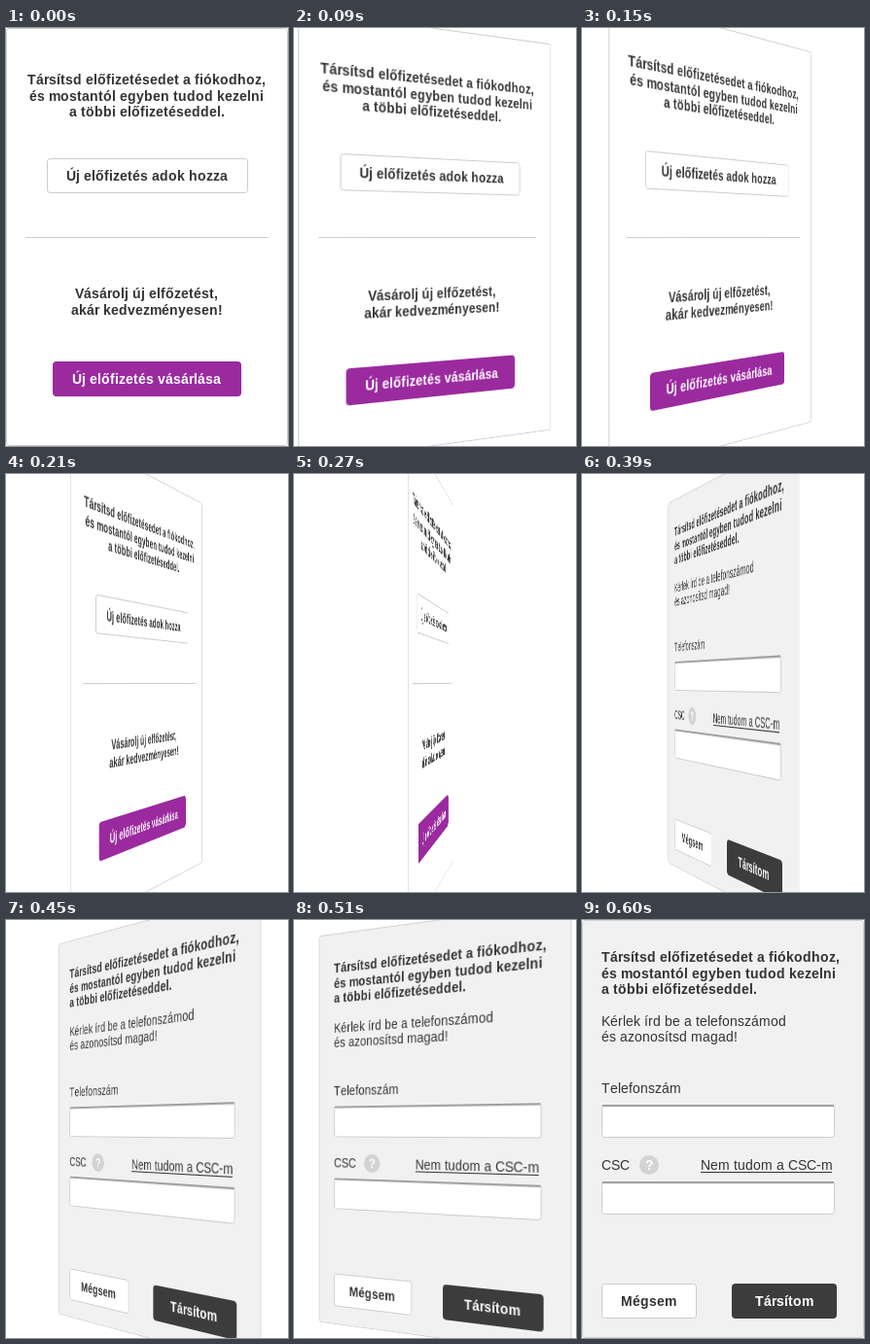
An HTML page that plays this animation: 290x430 px, repeating every 0.63 s.

```html
<!DOCTYPE html>
<html lang="hu">
<head>
<meta charset="utf-8">
<title>Előfizetés</title>
<style>
  html, body { margin: 0; width: 100%; height: 100%; overflow: hidden; background: #fff; }
  .stage { position: relative; width: 290px; height: 430px; overflow: hidden; perspective: 800px; }
  .card, .face { position: absolute; inset: 0; }
  .card { transform-style: preserve-3d; }
  .face { backface-visibility: hidden; }
  .back { transform: rotateY(180deg); }
  svg { display: block; }
  text { font: 14px "Liberation Sans", Arial, sans-serif; font-kerning: none; fill: #333; }
  .bold { font-weight: bold; }
  .light { fill: #fff; }
</style>
</head>
<body>
<div class="stage">
  <div class="card">
    <div class="face front"><svg width="290" height="430"></svg></div>
    <div class="face back"><svg width="290" height="430"></svg></div>
  </div>
</div>
<script>
const NS = 'http://www.w3.org/2000/svg';
const STEP = 30, STEPS = 21, TURN = 9;
const pen = document.createElement('canvas').getContext('2d');

function add(svg, tag, attrs) {
  const el = document.createElementNS(NS, tag);
  for (const k in attrs) el.setAttribute(k, attrs[k]);
  return svg.appendChild(el);
}

function box(svg, x, y, width, height, fill, stroke, rx = 3) {
  const o = stroke ? 0.5 : 0;
  add(svg, 'rect', {
    x: x + o, y: y + o, width: width - 2 * o, height: height - 2 * o,
    rx, fill, stroke: stroke || 'none'
  });
}

// Glyphs advance by whole pixels; x = null centres the line.
function write(svg, str, x, y, cls = '') {
  pen.font = (cls.includes('bold') ? 'bold ' : '') + '14px "Liberation Sans", Arial, sans-serif';
  const steps = [...str].map(c => Math.round(pen.measureText(c).width));
  const total = steps.reduce((a, b) => a + b, 0);
  let at = x === null ? Math.floor((290 - total) / 2) : x;
  const xs = steps.map(w => (at += w) - w);
  add(svg, 'text', { x: xs.join(' '), y, class: cls }).textContent = str;
}

function field(svg, y) {
  box(svg, 20, y, 240, 34, '#fff', '#ccc');
  add(svg, 'rect', { x: 21, y, width: 238, height: 1, fill: '#999' });
  add(svg, 'rect', { x: 20.5, y: y + 1, width: 239, height: 1, fill: '#aaa' });
  add(svg, 'rect', { x: 21, y: y + 2, width: 238, height: 1, fill: '#eee' });
}

const [front, back] = document.querySelectorAll('svg');
const intro = ['Társítsd előfizetésedet a fiókodhoz,', 'és mostantól egyben tudod kezelni', 'a többi előfizetéseddel.'];

box(front, 0, 0, 290, 430, '#fff', '#ccc');
intro.forEach((s, i) => write(front, s, null, [58, 75, 91][i], 'bold'));
box(front, 42, 134, 207, 36, '#fff', '#ccc');
write(front, 'Új előfizetés adok hozza', 62, 157, 'bold');
add(front, 'rect', { x: 20, y: 215, width: 250, height: 1, fill: '#ccc' });
write(front, 'Vásárolj új elfőzetést,', null, 278, 'bold');
write(front, 'akár kedvezményesen!', null, 295, 'bold');
box(front, 48, 343, 194, 36, '#9b2a9f', null, 4);
write(front, 'Új előfizetés vásárlása', 68, 366, 'bold light');

box(back, 0, 0, 290, 430, '#f1f1f1', '#d2d2d2');
intro.forEach((s, i) => write(back, s, 20, [43, 60, 76][i], 'bold'));
write(back, 'Kérlek írd be a telefonszámod', 20, 109);
write(back, 'és azonosítsd magad!', 20, 125);
write(back, 'Telefonszám', 20, 178);
field(back, 190);
write(back, 'CSC', 20, 257);
add(back, 'circle', { cx: 69, cy: 252, r: 10, fill: '#d3d3d3' });
write(back, '?', 65, 257, 'bold light');
write(back, 'Nem tudom a CSC-m', 122, 257);
add(back, 'rect', { x: 122, y: 259, width: 135, height: 1, fill: '#333' });
field(back, 269);
box(back, 20, 374, 98, 36, '#fff', '#ccc');
write(back, 'Mégsem', 40, 397, 'bold');
box(back, 154, 374, 108, 36, '#3c3c3c', null, 4);
write(back, 'Társítom', 178, 397, 'bold light');

document.querySelector('.card').animate(
  [{ transform: 'rotateY(0deg)' }, { transform: `rotateY(${TURN * STEPS}deg)` }],
  { duration: STEP * STEPS, iterations: Infinity, easing: `steps(${STEPS}, end)` }
);
</script>
</body>
</html>
```
